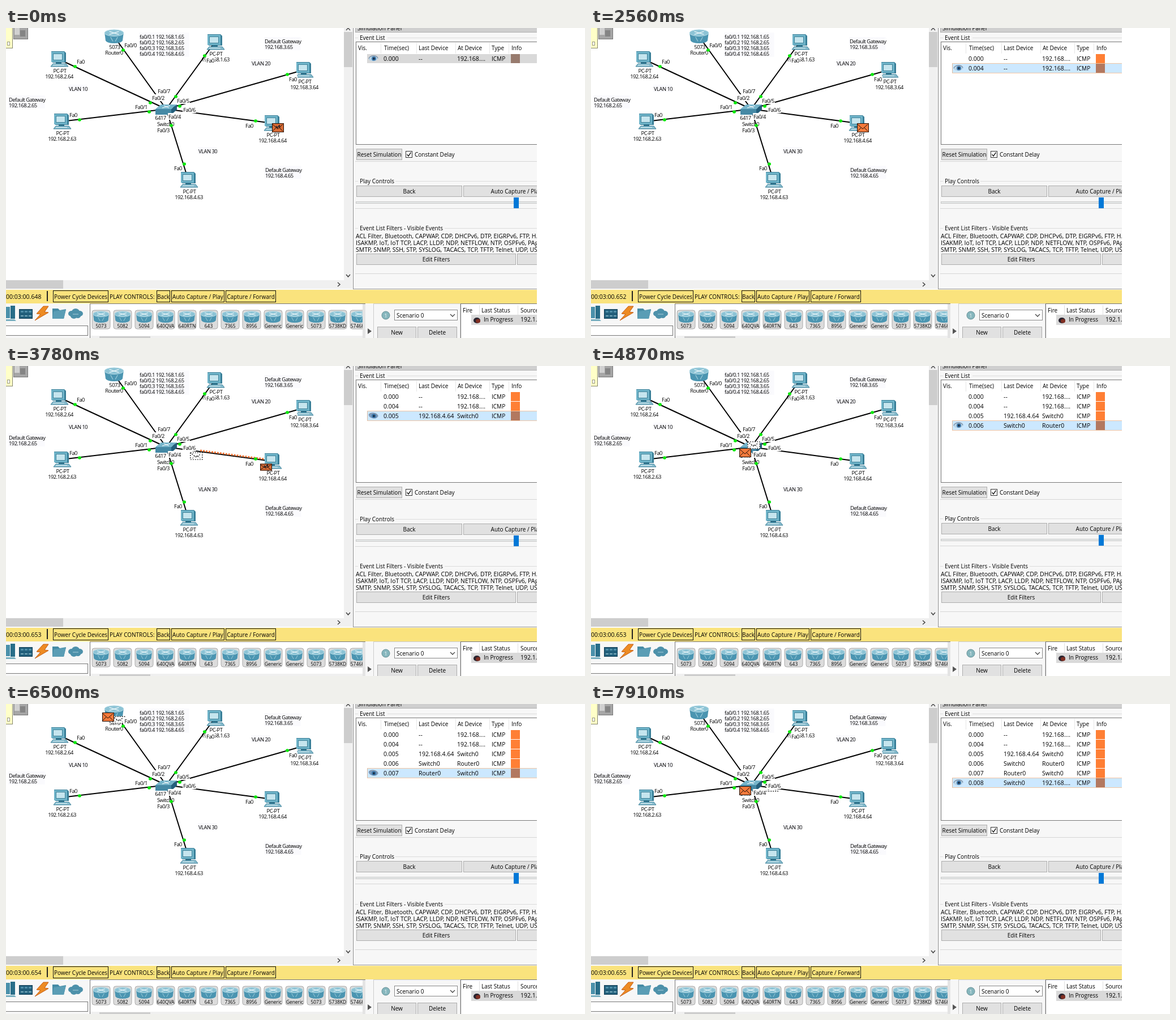
Animation of 1023 by 547 pixels, one loop 7990 ms. Source, as an HTML page with a canvas:

```html
<!DOCTYPE html>
<html lang="en">
<head>
<meta charset="utf-8">
<title>Network simulation</title>
<style>
html, body { margin: 0; width: 100%; height: 100%; overflow: hidden; background: #fff; }
canvas { display: block; }
</style>
</head>
<body>
<canvas id="stage" width="1023" height="547"></canvas>
<script>
const c = document.getElementById('stage').getContext('2d');
const LOOP = 7990, HOP = 1100;
const PANEL = '#f7f7f7', INACTIVE = '#d9d9d9';
const UI = '10px "Open Sans", "Noto Sans", sans-serif';
const DIGITS = '10.5px "Open Sans", "Noto Sans", sans-serif';
const MAP = '9.4px "Open Sans", "Noto Sans", sans-serif';
const TINY = '8.4px "Open Sans", "Noto Sans", sans-serif';

const router = [191, 15], hub = [283, 143], sender = [470, 168];
const pcs = [
  [93, 55, '192.168.2.64'], [98, 165, '192.168.2.63'], [369, 25, '192.168.1.63'],
  [526, 74, '192.168.3.64'], [470, 168, '192.168.4.64'], [322, 268, '192.168.4.63']
];
const ports = [
  ['Fa0', 132, 59], ['Fa0', 119, 153], ['Fa0/0', 220, 30], ['Fa0', 361, 57], ['Fa0', 507, 90],
  ['Fa0', 430, 172], ['Fa0', 304, 247], ['Fa0/7', 279, 111], ['Fa0/2', 269, 123], ['Fa0/1', 239, 139],
  ['Fa0/5', 313, 128], ['Fa0/6', 324, 144], ['Fa0/4', 298, 156], ['Fa0/3', 278, 180]
];
const dots = [[122, 68], [130, 162], [207, 39], [351, 49], [497, 82], [441, 164], [315, 240],
  [255, 132], [253, 148], [300, 121], [307, 138], [292, 172]];
const notes = [
  [236, 15, 'fa0/0.1 192.168.1.65', 'fa0/0.2 192.168.2.65', 'fa0/0.3 192.168.3.65', 'fa0/0.4 192.168.4.65'],
  [457, 23, 'Default Gateway', '192.168.3.65'], [5, 126, 'Default Gateway', '192.168.2.65'],
  [458, 250, 'Default Gateway', '192.168.4.65'],
  [434, 62, 'VLAN 20'], [111, 107, 'VLAN 10'], [340, 217, 'VLAN 30']
];
const models = ['5073', '5082', '5094', '640QVA', '640RTN', '643', '7365', '8956',
  'Generic', 'Generic', '5073', '5738KD', '5746KD'];
const events = [
  { at: 0, time: '0.000', last: '--', device: '192.168....' },
  { at: 2470, time: '0.004', last: '--', device: '192.168....' },
  { at: 2930, time: '0.005', last: '192.168.4.64', device: 'Switch0',
    from: sender, to: hub, path: [481, 176, 294, 154] },
  { at: 4840, time: '0.006', last: 'Switch0', device: 'Router0',
    from: hub, to: router, path: [290, 143, 203, 27] },
  { at: 6420, time: '0.007', last: 'Router0', device: 'Switch0',
    from: router, to: hub, path: [192, 19, 290, 142] },
  { at: 7740, time: '0.008', last: 'Switch0', device: '192.168....',
    from: hub, to: sender, path: [290, 144, 481, 169] }
];
const clock = [[7050, 655], [5250, 654], [3500, 653], [2320, 652], [0, 648]];

function box(x, y, w, h, fill, stroke) {
  if (fill) { c.fillStyle = fill; c.fillRect(x, y, w, h); }
  if (stroke) { c.strokeStyle = stroke; c.lineWidth = 1; c.strokeRect(x + .5, y + .5, w - 1, h - 1); }
}
function poly(points, fill, stroke, width = 1, closed = true) {
  c.beginPath();
  for (let i = 0; i < points.length; i += 2) c.lineTo(points[i], points[i + 1]);
  if (closed) c.closePath();
  if (fill) { c.fillStyle = fill; c.fill(); }
  if (stroke) { c.strokeStyle = stroke; c.lineWidth = width; c.stroke(); }
}
function oval(x, y, rx, ry, fill, stroke) {
  c.beginPath();
  c.ellipse(x, y, rx, ry, 0, 0, 7);
  c.fillStyle = fill; c.fill();
  if (stroke) { c.strokeStyle = stroke; c.lineWidth = 1; c.stroke(); }
}
function text(s, x, y, font = UI, align = 'left', color = '#000') {
  c.font = font;
  c.letterSpacing = font === MAP ? '-0.5px' : '0px';
  c.textAlign = align;
  c.fillStyle = color;
  c.fillText(s, x, y + 3.7);
}
function button(s, x, y, w, h) {
  box(x, y, w, h, '#e1e1e1', '#adadad');
  text(s, x + w / 2, y + h / 2, UI, 'center');
}
function line(x1, y1, x2, y2, color, width = 1) {
  poly([x1, y1, x2, y2], null, color, width, false);
}

function pc(x, y) {
  poly([x - 13, y - 14, x + 10, y - 14, x + 13, y - 11, x + 13, y + 6, x - 11, y + 6], '#397f98');
  box(x - 13, y - 13, 23, 18, '#6fb4c9');
  box(x - 10, y - 10, 17, 12, '#c5e5ee', '#3f8198');
  box(x - 5, y + 5, 10, 4, '#2d6f88');
  poly([x - 10, y + 8, x + 13, y + 8, x + 17, y + 13, x - 14, y + 13], '#8abfd0', '#397f98');
  line(x - 10, y + 10.5, x + 10, y + 10.5, '#e1f1f5');
}
function cylinder(x, y, s) {
  const rx = 16 * s, ry = 5.5 * s, top = y - 6 * s, bottom = y + 6 * s;
  poly([x - rx, top, x + rx, top, x + rx * .9, bottom, x - rx * .9, bottom], '#4b95b1');
  oval(x, bottom, rx * .9, ry, '#4b95b1');
  oval(x, top, rx, ry, '#8cc3d5', '#b5dbe6');
  for (const d of [-1, 1]) {
    line(x - 8 * s, top + d * 2.5 * s, x + 8 * s, top - d * 2.5 * s, '#eef8fb', 1.2 * s);
    line(x + d * 6 * s, top + 7 * s, x + d * 2 * s, bottom + 2 * s, '#a7d2df', s);
  }
}
function switchBox(x, y) {
  poly([x - 19, y, x - 9, y - 8, x + 19, y - 8, x + 9, y], '#75b4ca');
  poly([x + 9, y, x + 19, y - 8, x + 19, y + 1, x + 9, y + 10], '#245f7c');
  box(x - 19, y, 28, 10, '#4589a5');
  line(x - 7, y - 2, x + 7, y - 6, '#fff');
  line(x - 4, y - 6, x + 5, y - 2, '#fff');
}
function envelope(x, y, h, busy) {
  const top = y - h / 2, bottom = top + h;
  box(x - 10, top, 21, h, busy ? '#d86b35' : '#f47a3c', '#201008');
  poly([x - 9, top + 2, x, y + 2, x + 9, top + 2], null, '#201008', 1, false);
  line(x - 9, bottom - 2, x - 3, y, '#201008');
  line(x + 9, bottom - 2, x + 3, y, '#201008');
  if (busy) poly([x - 3, y - 3, x - 1, y, x + 3, y - 4, x + 4, y], null, '#1b1b24', 1.5, false);
}
function ghost(x, y) {
  box(x - 11, y - 6.5, 22, 13, '#fff');
  c.setLineDash([2, 2]);
  c.strokeStyle = '#000';
  c.lineWidth = 1.2;
  c.strokeRect(x - 10.5, y - 6, 21, 12);
  poly([x - 8, y - 4, x, y + 2, x + 8, y - 4], null, '#000', 1.2, false);
  poly([x - 7, y + 4, x - 3, y, x + 3, y, x + 7, y + 4], null, '#000', 1, false);
  c.setLineDash([]);
}
function portLabel([s, x, y]) {
  c.font = MAP;
  c.letterSpacing = '-0.5px';
  const w = c.measureText(s).width;
  box(x - w / 2 - 1, y - 6, w + 2, 12, '#fff');
  text(s, x, y, MAP, 'center');
}

function topology(t, event) {
  box(0, 0, 598, 446, '#fff');
  box(-2, -4, 14, 40, '#ffffc8', '#86866b');
  box(2, 24, 5, 7, '#fff', '#99997c');
  box(13, -4, 26, 24, '#a6a6a6', '#787878');
  box(15, 0, 9, 12, '#d0d0d0');
  box(25, 4, 9, 11, '#858585');
  for (const [x, y, ...rows] of notes) {
    c.font = MAP;
    box(x - 1, y - 7, c.measureText(rows[0]).width, rows.length * 10 + 3, '#fafafd');
    rows.forEach((s, i) => text(s, x, y + i * 10, MAP));
  }
  for (const [x, y] of [router, ...pcs]) line(x, y, ...hub, '#000', 2);

  const { from, to, path } = event;
  const p = Math.min(1, (t - event.at) / HOP);
  if (path) {
    const q = Math.max(0, p - .09);
    c.setLineDash([3, 2]);
    line(from[0], from[1] - 2, from[0] + (to[0] - from[0]) * q,
      from[1] - 2 + (to[1] - from[1]) * q, '#f07030', 3);
    c.setLineDash([]);
  }
  for (const [x, y, ip] of pcs) {
    pc(x, y);
    text('PC-PT', x + 2, y + 20, MAP, 'center');
    text(ip, x + 1, y + 30, MAP, 'center');
  }
  cylinder(...router, 1.05);
  text('5073', 192, 33, MAP, 'center');
  text('Router0', 191, 43, MAP, 'center');
  switchBox(...hub);
  text('6417', 273, 158, MAP, 'center');
  text('Switch0', 282, 169, MAP, 'center');
  if (path) ghost(path[0] + (path[2] - path[0]) * p, path[1] + (path[3] - path[1]) * p);
  ports.forEach(portLabel);
  for (const [x, y] of dots) oval(x, y, 3, 2.8, '#0be80b');
  if (!path) envelope(480, 176, 16, t < 1540);
  else if (from === sender) envelope(459, 178.5, 12, true);
  else envelope(from[0] - 11, from[1] + (from === router ? 8 : 10), 16);

  box(597, 0, 15, 445, '#f0f0f0');
  box(597, 7, 15, 62, '#cdcdcd');
  poly([601, 4, 604.5, 0, 608, 4], null, '#555', 1.5, false);
  poly([601, 435, 604.5, 439, 608, 435], null, '#444', 1.5, false);
  box(0, 445, 612, 15, '#f0f0f0');
  box(0, 445, 101, 15, '#cdcdcd');
  poly([586, 449, 590, 452.5, 586, 456], null, '#444', 1.5, false);
  line(613.5, 0, 613.5, 461, '#888');
}

function eye(x, y, tilted) {
  c.save();
  c.translate(x, y);
  c.rotate(tilted ? .15 : -.05);
  oval(0, 0, 8, 4.5, tilted ? '#7c9bbd' : '#b9d5e8');
  oval(1, 0, 4, 3.8, '#3e78aa');
  oval(1, 0, 1.7, 2, '#16263c');
  c.beginPath();
  c.ellipse(0, 0, 8, 5, 0, Math.PI, 2 * Math.PI);
  c.strokeStyle = '#7d90a6';
  c.lineWidth = 1.3;
  c.stroke();
  c.restore();
}
function eventTable(t) {
  box(614, 0, 324, 461, PANEL);
  box(617, -5, 323, 13, '#cfcfcf', '#b0b0b0');
  text('Simulation Panel', 621, 0);
  line(617, 17.5, 938, 17.5, '#dcdcdc');
  box(622, 11, 52, 13, PANEL);
  text('Event List', 625, 17);
  box(618, 24, 325, 182, '#fff', '#777');
  for (const [s, x] of [['Vis.', 622], ['Time(sec)', 668], ['Last Device', 729], ['At Device', 798], ['Type', 858], ['Info', 893]])
    text(s, x, 35);
  for (const x of [662, 725, 794, 854, 888]) line(x + .5, 26, x + .5, 45, '#e5e5e5');
  const shown = events.filter(e => e.at <= t);
  shown.forEach((e, i) => {
    const y = 54 + i * 17, selected = i === shown.length - 1;
    if (selected) {
      box(638, y - 8, 302, 16, i ? '#cce8ff' : INACTIVE);
      if (i) {
        c.setLineDash([1, 1]);
        box(638, y - 9, 304, 18, null, '#e68a45');
        c.setLineDash([]);
      }
      eye(649, y, i === 2 || i === 4);
    }
    text(e.time, 667, y, DIGITS);
    text(e.last, 729, y, DIGITS);
    text(e.device, 797, y, DIGITS);
    text('ICMP', 858, y);
    box(892, y - 8, 16, 16, !selected ? '#ff7f35' : i ? '#b27860' : '#987b6e');
  });
}
function controls(t) {
  button('Reset Simulation', 619, 213, 81, 20);
  box(706, 217, 12, 12, '#fff', '#333');
  poly([708.5, 223, 711, 226, 715.5, 219.5], null, '#222', 1.4, false);
  text('Constant Delay', 722, 223);
  line(617, 235.5, 938, 235.5, '#d5d5d5');

  c.save();
  c.translate(0, t >= 4470 ? -1 : 0);
  line(617, 270.5, 938, 270.5, '#dcdcdc');
  box(622, 264, 66, 13, PANEL);
  text('Play Controls', 625, 270);
  button('Back', 619, 278, 187, 20);
  button('Auto Capture / Play', 808, 278, 187, 20);
  box(618, 306, 322, 4, '#e7eaea', '#c8c8c8');
  box(897, 299, 9, 20, '#0078d7');
  line(617, 318.5, 938, 318.5, '#d5d5d5');
  c.restore();

  line(617, 353.5, 938, 353.5, '#dcdcdc');
  box(622, 347, 153, 13, PANEL);
  text('Event List Filters - Visible Events', 625, 353);
  ['ACL Filter, Bluetooth, CAPWAP, CDP, DHCPv6, DTP, EIGRPv6, FTP, H.323,',
   'ISAKMP, IoT, IoT TCP, LACP, LLDP, NDP, NETFLOW, NTP, OSPFv6, PAgP,',
   'SMTP, SNMP, SSH, STP, SYSLOG, TACACS, TCP, TFTP, Telnet, UDP, USB'
  ].forEach((s, i) => text(s, 618, 367 + i * 12.2, DIGITS));
  button('Edit Filters', 619, 398, 282, 20);
  button('', 903, 398, 80, 20);
  line(617, 433.5, 938, 433.5, '#d5d5d5');
  line(614, 460.5, 938, 460.5, '#999');
}

function toolbar(t) {
  box(0, 462, 938, 24, '#fae37d');
  text('00:03:00.' + clock.find(e => e[0] <= t)[1], 0, 474, DIGITS);
  box(72, 464, 2, 18, '#222');
  for (const [s, x, w] of [['Power Cycle Devices', 83, 98], ['Back', 266, 24], ['Auto Capture / Play', 292, 94], ['Capture / Forward', 388, 89]]) {
    box(x, 463, w, 21, null, '#111');
    text(s, x + w / 2, 474, UI, 'center');
  }
  text('PLAY CONTROLS:', 183, 474);
}
function palette() {
  box(0, 461, 938, 86, PANEL);
  box(0, 492, 7, 20, '#4b91ab');
  box(8, 490, 8, 23, '#286d89');
  poly([0, 514, 15, 514, 18, 517, 0, 517], '#77aebf');
  box(23, 496, 24, 17, '#215f7b', '#133f56');
  for (const x of [26, 33, 40]) {
    box(x, 499, 5, 3, '#4f8fa9');
    box(x, 507, 5, 2, '#76a9bb');
  }
  poly([66, 491, 75, 491, 68, 501, 75, 502, 51, 516, 61, 505, 54, 504], '#ed8b23', '#c65d15');
  poly([82, 495, 92, 495, 95, 498, 106, 496, 102, 513, 82, 513], '#468ba5');
  poly([84, 500, 106, 497, 102, 513, 82, 513], '#5a9db5');
  for (const [x, y, r] of [[116, 504, 6], [123, 501, 7], [130, 504, 6], [120, 508, 6], [127, 508, 5]]) oval(x, y, r, r - 1, '#4d91aa');
  line(118, 505, 128, 505, '#a9cedb');
  box(-2, 525, 147, 18, '#fff', '#777');

  box(148, 486, 487, 64, '#fff', '#777');
  c.save();
  c.beginPath();
  c.rect(149, 486, 482, 61);
  c.clip();
  models.forEach((name, i) => {
    const x = 168 + i * 38;
    c.beginPath();
    c.roundRect(x - 16, 498, 32, 33, 4);
    c.fillStyle = '#dcdcdc'; c.fill();
    c.strokeStyle = '#aaa'; c.lineWidth = 1; c.stroke();
    cylinder(x, 510, .88);
    text(name, x, 525, TINY, 'center');
  });
  box(149, 543, 483, 4, '#f0f0f0');
  box(165, 544, 90, 3, '#cdcdcd');
  c.restore();
  box(630, 487, 5, 60, '#e4e4e4');
  poly([639, 530, 646, 535, 639, 540], '#555');

  box(649, 486, 154, 62, PANEL, '#ccc');
  oval(671, 507, 7, 7, '#86b6bd', '#648e94');
  text('1', 671, 507, TINY, 'center', '#fff');
  box(686, 497, 112, 19, '#fff', '#888');
  text('Scenario 0', 690, 507);
  poly([785, 505, 789, 509, 793, 505], null, '#444', 1.3, false);
  button('New', 656, 527, 69, 21);
  button('Delete', 727, 527, 70, 21);
  box(803, 486, 140, 62, '#fff', '#777');
  text('Fire', 807, 498);
  text('Last Status', 840, 498);
  text('Source', 909, 498);
  for (const x of [836, 904]) line(x + .5, 489, x + .5, 506, '#e0e0e0');
  box(822, 506, 118, 18, INACTIVE);
  oval(832, 516, 6, 5, '#29242f');
  oval(834, 517, 4, 3.5, '#812f22');
  text('In Progress', 844, 514);
  text('192.1...', 909, 514, DIGITS);
}

function draw(now) {
  const t = now % LOOP;
  topology(t, events.findLast(e => e.at <= t));
  eventTable(t);
  controls(t);
  palette();
  toolbar(t);
  box(938, 0, 85, 547, '#fff');
}
const start = performance.now();
function tick() {
  draw(performance.now() - start);
  requestAnimationFrame(tick);
}
tick();
</script>
</body>
</html>
```
